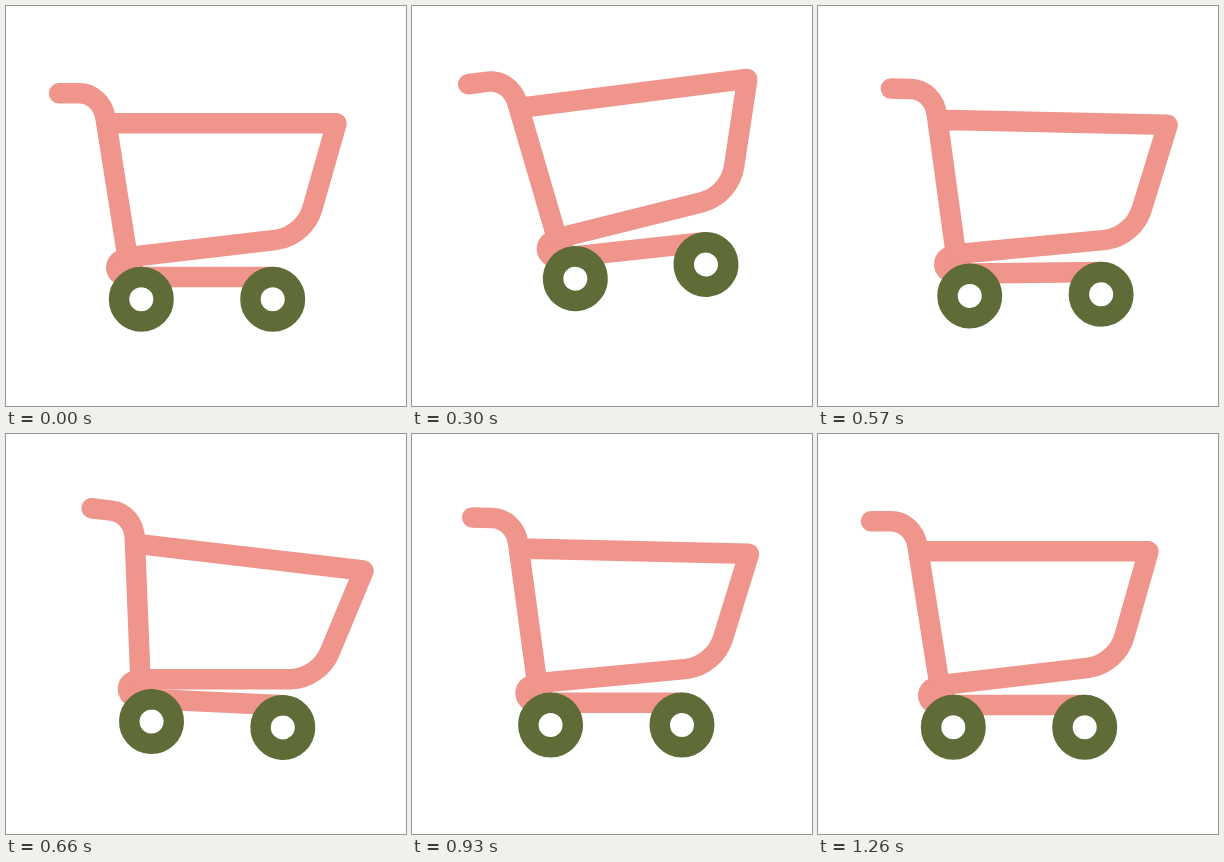
An HTML page for the animation above (3290 ms loop, 400 by 400 pixels).

```html
<!DOCTYPE html>
<html lang="en">
<head>
<meta charset="utf-8">
<title>Hopping cart</title>
<style>
  html, body { margin: 0; width: 100%; height: 100%; overflow: hidden; background: #fff; }
  svg { display: block; width: 100%; height: 100%; }
  .frame { fill: none; stroke: #ef958b; stroke-width: 20.5; stroke-linecap: round; stroke-linejoin: round; }
  .wheel { fill: none; stroke: #5f6c37; stroke-width: 20.5; }
</style>
</head>
<body>
<svg viewBox="0 0 400 400">
  <g id="cart">
    <path class="frame" d="M120 271H267"/>
    <g id="basket">
      <circle cx="118.5" cy="261.5" r="18.5" fill="#ef958b"/>
      <path class="frame" d="M53 87.2H73C86 87.2 97 97 99.5 112L121.6 251.3L271 233.7C288 231.2 302 218 306.5 202L330.5 117.5L330 117.2H100.3"/>
    </g>
    <circle class="wheel" cx="135.3" cy="293.3" r="22.25"/>
    <circle class="wheel" cx="266.7" cy="293.3" r="22.25"/>
  </g>
</svg>
<script>
  const STEP = 30, LOOP = 3290, REST = 36;

  // Turning points as [step, value]; the motion eases from one to the next
  const lift = [[0, 0], [13.7, -33.8], [20.5, 0], [25.5, -13], [REST - 3, 0]];
  const tilt = [[0, 0], [12.7, -7], [23.5, 3.1], [31, 0]];
  const sway = [[0, 0], [5, 2.2], [13.7, -13.3], [21.8, 6.8], [26, -3.8], [32, 1.7], [REST, 0]];

  function swing(turns, n) {
    const i = turns.findIndex(turn => turn[0] > n);
    if (i < 0) return turns[turns.length - 1][1];
    const [t0, a] = turns[i - 1], [t1, b] = turns[i];
    const u = (n - t0) / (t1 - t0);
    return a + (b - a) * u * u * (3 - 2 * u);
  }

  // Quick roll forward, then a long glide back
  function roll(n) {
    const reach = 30, peak = 13.4, spread = 38;
    if (n < peak) return reach * Math.sin(Math.PI / 2 * n / peak);
    const fade = Math.max(0, Math.min(1, (REST - n) / 5));
    return fade * reach / (1 + (n - peak) ** 2 / spread);
  }

  const cart = document.getElementById("cart");
  const basket = document.getElementById("basket");

  function draw(ms) {
    const n = Math.floor((ms % LOOP) / STEP);
    const lean = swing(tilt, n);
    cart.setAttribute("transform", `translate(${roll(n)} ${swing(lift, n)}) rotate(${lean} 201 293.3)`);
    basket.setAttribute("transform", `rotate(${swing(sway, n) - lean} 118.5 261)`);
  }

  const start = performance.now();
  function tick() {
    draw(performance.now() - start);
    requestAnimationFrame(tick);
  }
  tick();
</script>
</body>
</html>
```
